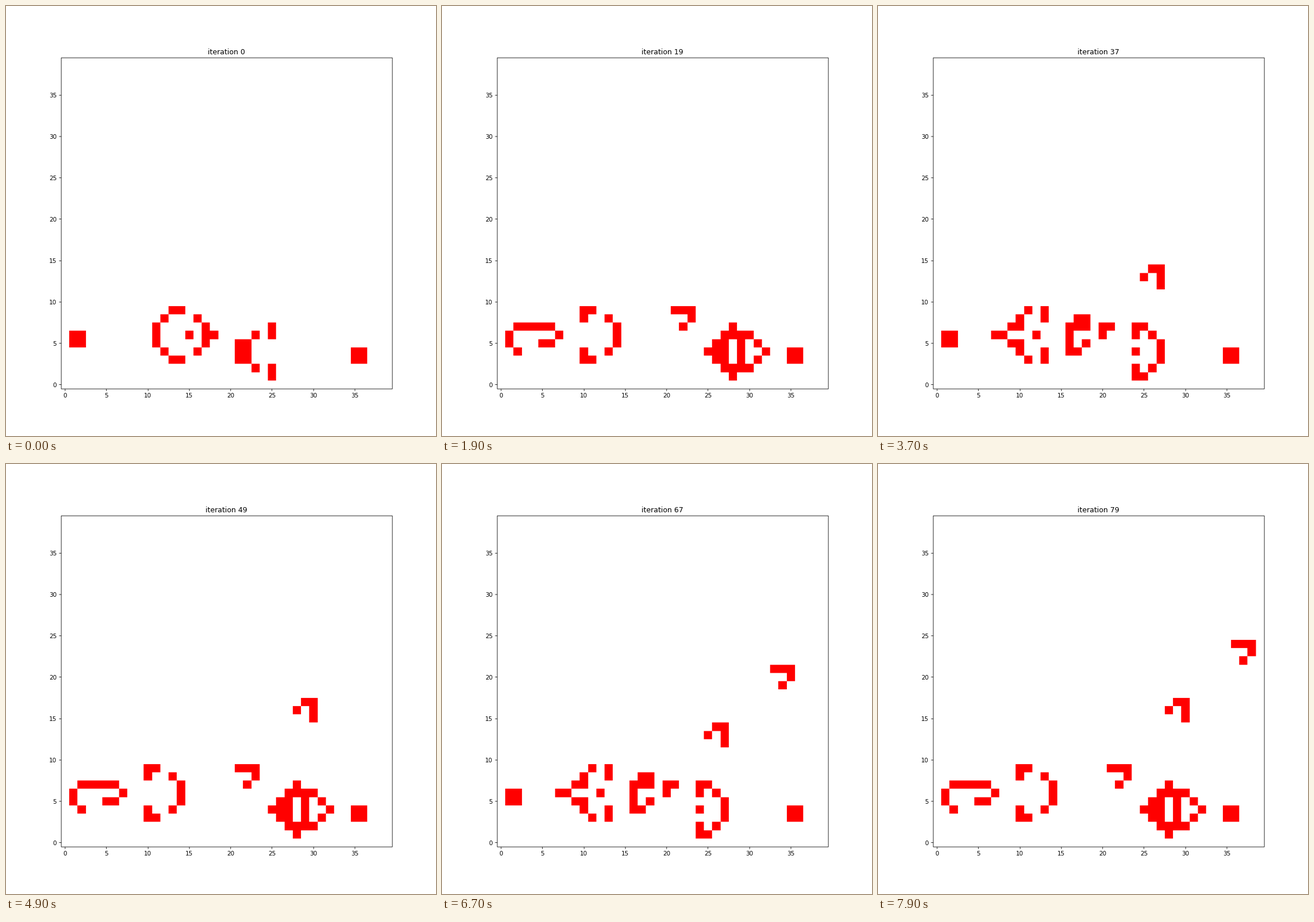
Recreate the animation shown at these times as a matplotlib script. Size 748 by 748 pixels, loop 8 s.

```python
import numpy as np
import matplotlib.pyplot as plt
from matplotlib.animation import FuncAnimation
from matplotlib.collections import LineCollection
from matplotlib.patches import PathPatch, Rectangle
from matplotlib.path import Path
from matplotlib.transforms import Affine2D

N = 40
STEPS = 80
DPI = 74.8

# Layout units: a 1000 x 1000 sheet, y upwards
LEFT, BOTTOM, SIDE = 127.5, 110, 770
CELL = SIDE / N

# Glider gun as x: ys
GUN = {
    1: (5, 6), 2: (5, 6),
    11: (5, 6, 7), 12: (4, 8), 13: (3, 9), 14: (3, 9), 15: (6,),
    16: (4, 8), 17: (5, 6, 7), 18: (6,),
    21: (3, 4, 5), 22: (3, 4, 5), 23: (2, 6), 25: (1, 2, 6, 7),
    35: (3, 4), 36: (3, 4),
}


def evolve(grid):
    p = np.pad(grid, 1)
    count = sum(p[i:i + N, j:j + N]
                for i in range(3) for j in range(3)) - grid
    return ((count == 3) | ((grid == 1) & (count == 2))).astype(int)


def snap(v):
    return np.floor(v + 0.5) + 0.5


def edge(k):
    return np.ceil(CELL * k - 0.5)


def square(x, y):
    x0, x1 = 128 + edge(x), 128 + edge(x + 1)
    y0, y1 = BOTTOM + edge(y), BOTTOM + edge(y + 1)
    return Path([(x0, y0), (x1, y0), (x1, y1), (x0, y1), (x0, y0)],
                closed=True)


def outline(grid):
    return Path.make_compound_path(*[square(x, y) for x, y in np.argwhere(grid)])


grid = np.zeros((N, N), int)
for x, ys in GUN.items():
    grid[x, list(ys)] = 1
shapes = []
for _ in range(STEPS):
    shapes.append(outline(grid))
    grid = evolve(grid)

fig, ax = plt.subplots(figsize=(10, 10), dpi=DPI)
sheet = Affine2D().scale(DPI / 100)

# The axes place the text; frame and ticks are drawn on the sheet
ax.set_aspect("equal")
ax.set(xlim=(-0.5, N - 0.5), ylim=(-0.5, N - 0.5))
marks = np.arange(0, N, 5)
ax.set_xticks(marks)
ax.set_yticks(marks)
ax.tick_params(color="none")
ax.spines[:].set_visible(False)
title = ax.set_title("iteration 0")

cells = PathPatch(shapes[0], facecolor="red", linewidth=0,
                  transform=sheet, snap=False, zorder=2)
fig.add_artist(cells)

x0, x1 = snap(LEFT), snap(LEFT + SIDE)
y0, y1 = BOTTOM - 0.5, BOTTOM + SIDE - 0.5
fig.add_artist(Rectangle((x0, y0), x1 - x0, y1 - y0, fill=False,
                         edgecolor="black", linewidth=0.8,
                         transform=sheet, snap=False, zorder=3))

ticks = []
for m in marks:
    tx = snap(LEFT + CELL * (m + 0.5))
    ty = 1000 - snap(1000 - BOTTOM - CELL * (m + 0.5))
    ticks += [[(tx, y0), (tx, y0 - 5)], [(x0, ty), (x0 - 5, ty)]]
tick_lines = LineCollection(ticks, colors="black", linewidths=0.8,
                            transform=sheet, zorder=3)
tick_lines.set_snap(False)
fig.add_artist(tick_lines)


def draw(i):
    cells.set_path(shapes[i])
    title.set_text(f"iteration {i}")
    return cells, title


anim = FuncAnimation(fig, draw, frames=STEPS, interval=100,
                     repeat=True, repeat_delay=0, blit=False)
plt.show()
```
